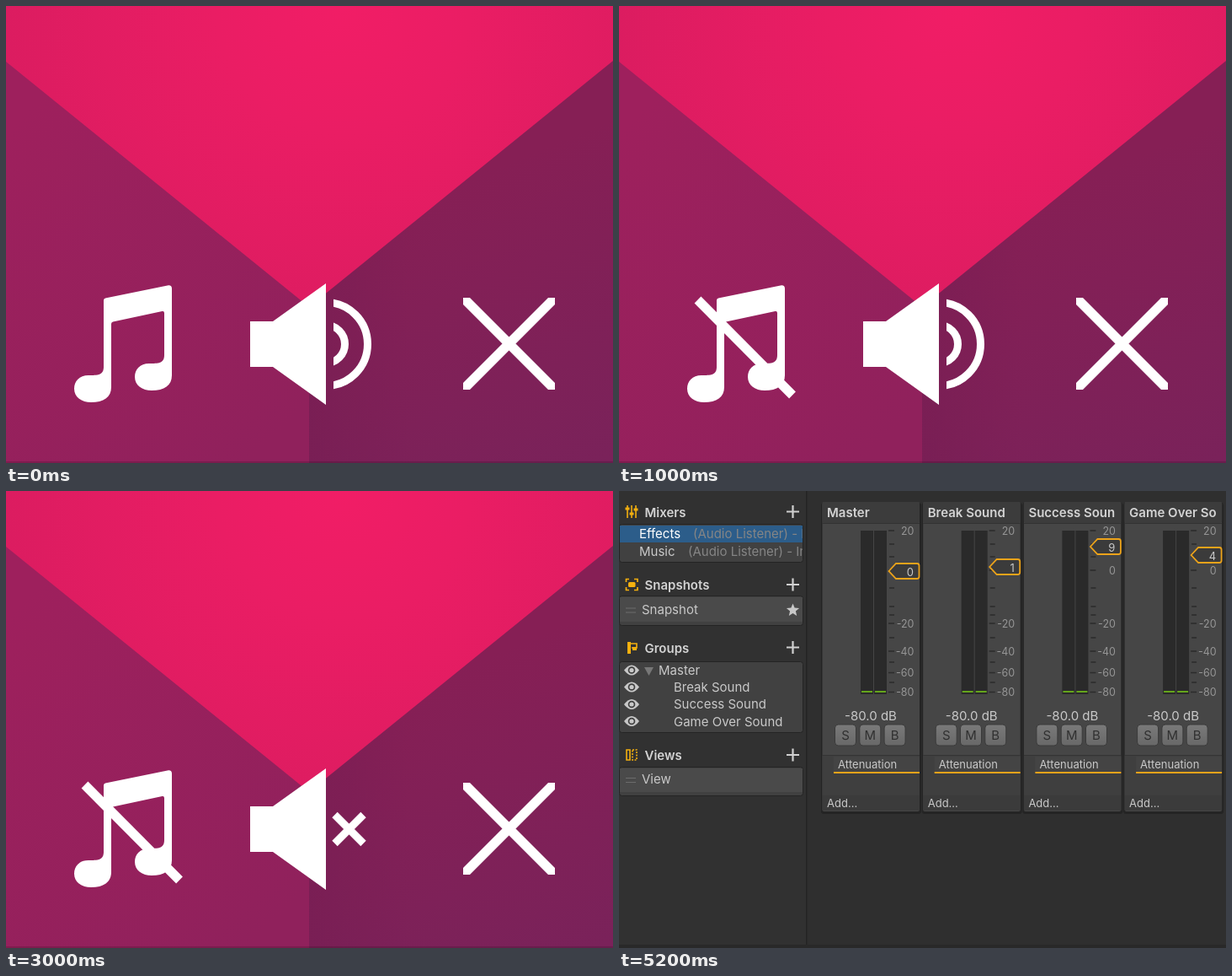
These frames come from a looping animation (721x542 px, 6000 ms). An HTML page:

```html
<!DOCTYPE html>
<html lang="en">
<head>
<meta charset="utf-8">
<title>Sound toggles and mixer</title>
<style>
  html, body { margin: 0; width: 100%; height: 100%; overflow: hidden; background: #2f2f2f; }
  svg { display: block; width: 721px; height: 542px; }
  text { font-family: Inter, Roboto, sans-serif; font-size: 15px; fill: #c9c9c9; white-space: pre; }
  .bold { font-weight: 600; fill: #d3d3d3; }
  .small { font-size: 13px; }
  .scale { font-size: 12.5px; fill: #959595; }
  .dim { fill: #858585; }
</style>
</head>
<body>
<svg viewBox="0 0 721 542">
  <defs>
    <radialGradient id="pink" gradientUnits="userSpaceOnUse" cx="400" cy="0" r="430">
      <stop offset="0" stop-color="#f11d66"/>
      <stop offset=".35" stop-color="#ea1d64"/>
      <stop offset="1" stop-color="#da1c60"/>
    </radialGradient>
    <linearGradient id="left" gradientUnits="userSpaceOnUse" x1="0" y1="150" x2="330" y2="500">
      <stop offset="0" stop-color="#9e205d"/>
      <stop offset="1" stop-color="#90215c"/>
    </linearGradient>
    <linearGradient id="right" gradientUnits="userSpaceOnUse" x1="560" y1="200" x2="700" y2="542">
      <stop offset="0" stop-color="#861f55"/>
      <stop offset="1" stop-color="#7a225a"/>
    </linearGradient>
    <linearGradient id="seam" gradientUnits="userSpaceOnUse" x1="360" y1="0" x2="480" y2="0">
      <stop offset="0" stop-color="#751d52" stop-opacity=".55"/>
      <stop offset="1" stop-color="#751d52" stop-opacity="0"/>
    </linearGradient>
    <linearGradient id="button" x1="0" y1="0" x2="0" y2="1">
      <stop offset="0" stop-color="#7a7a7a"/>
      <stop offset="1" stop-color="#686868"/>
    </linearGradient>
    <clipPath id="waveClip"><rect x="389" y="330" width="60" height="140"/></clipPath>
    <clipPath id="closeClip"><rect x="543" y="346" width="109" height="109"/></clipPath>
    <clipPath id="listClip"><rect x="1" y="40" width="217" height="44"/></clipPath>
  </defs>

  <g id="toggles">
    <rect width="721" height="542" fill="url(#pink)"/>
    <path d="M0 66L360 357V542H0Z" fill="url(#left)"/>
    <path d="M721 65L360 357V542H721Z" fill="url(#right)"/>
    <path d="M480 260L360 357V542H480Z" fill="url(#seam)"/>
    <rect y="540" width="721" height="2" fill="#000" opacity=".15"/>

    <path fill="#fff" d="M116 349Q116 347 118 346.500L193 331.200Q197 331 197 335V438
      C197 450 188 456 173 456C162 456 153 450 153 440C153 431 159 424 170 424
      C181 424 188 424 188 414V364Q188 361.500 185.500 362L127 374.500Q125 375 125 377V452
      C125 464 116 470 101 470C90 470 81 464 81 454C81 445 87 438 98 438
      C109 438 116 438 116 428Z"/>
    <path id="slash" d="M93.500 348.500L206 461.500" stroke="#fff" stroke-width="11"/>

    <path fill="#fff" d="M290 374H317L380 329V473L317 428H290Z"/>
    <g id="waves" clip-path="url(#waveClip)" fill="none" stroke="#fff" stroke-width="9">
      <circle cx="380" cy="401" r="49.500"/>
      <circle cx="380" cy="401" r="22.500"/>
    </g>
    <path id="mute" d="M390.500 384L424.500 418M424.500 384L390.500 418" stroke="#fff" stroke-width="9"/>
    <path clip-path="url(#closeClip)" d="M533 336L662 465M662 336L533 465" stroke="#fff" stroke-width="11.300"/>
  </g>

  <g id="mixer"></g>
</svg>
<script>
const $ = id => document.getElementById(id);
const tag = (name, attrs, body = '') =>
  `<${name} ${Object.entries(attrs).map(([k, v]) => `${k}="${v}"`).join(' ')}>${body}</${name}>`;
const box = (x, y, width, height, fill, more) => tag('rect', { x, y, width, height, fill, ...more });
const label = (x, y, body, cls = '', more) => tag('text', { x, y, class: cls, ...more }, body);
const line = (d, stroke, width = 1, fill = 'none') => tag('path', { d, stroke, 'stroke-width': width, fill });
const shape = (d, fill) => tag('path', { d, fill });

const GOLD = '#f3b00f', ORANGE = '#eda31a', LIGHT = '#c8c8c8';

function listBox(y, h, fill) {
  return box(.5, y + .5, 218, h - 1, fill, { rx: 3, stroke: '#242424' });
}

function header(y, title) {
  return label(30.5, y + 6, title, 'bold') +
    line(`M199 ${y}H214M206.500 ${y - 7.5}V${y + 7.5}`, '#d0d0d0', 2.2);
}

function handle(y) {
  return line(`M8 ${y - 2.5}H20M8 ${y + 2.5}H20`, '#6c6c6c', 1);
}

function eye(y) {
  return shape(`M6 ${y}Q15 ${y - 12} 24 ${y}Q15 ${y + 12} 6 ${y}Z`, LIGHT) +
    tag('circle', { cx: 15, cy: y, r: 4.3, fill: '#3f3f3f' }) +
    tag('circle', { cx: 15, cy: y, r: 2.6, fill: LIGHT });
}

function star(cx, cy, r) {
  const points = Array.from({ length: 10 }, (_, i) => {
    const a = i * Math.PI / 5, d = i % 2 ? r * .45 : r;
    return [cx + d * Math.sin(a), cy - d * Math.cos(a)].map(n => n.toFixed(1));
  });
  return tag('polygon', { points: points.join(' '), fill: LIGHT });
}

function sidebar() {
  const icons =
    line('M10 17V32M15 17V32M20 17V32', GOLD, 1.6) +
    line('M7.500 21H12.500M12.500 27H17.500M17.500 22H22.500', GOLD, 3) +
    line('M8.500 108V104.500H12M18 104.500H22V108M22 114V117.500H18M12 117.500H8.500V114', GOLD, 1.7) +
    box(11, 108, 8.5, 6, GOLD, { rx: 1.5 }) +
    box(10, 179, 4, 14, GOLD) + line('M14 181H21V186H15', GOLD, 1.6) + box(16, 185, 5, 4, GOLD) +
    line('M9 307H13V319H9Z', GOLD, 1.6) +
    tag('path', { d: 'M16 307H21V319H16Z', fill: 'none', stroke: GOLD, 'stroke-width': 1.6, 'stroke-dasharray': '2 1.5' });

  const mixers = listBox(39, 46, '#414141') + tag('g', { 'clip-path': 'url(#listClip)' },
    box(1, 41, 217, 20, '#2c5d8a') +
    label(24, 56, 'Effects', '', { style: 'fill:#fff' }) +
    label(88, 56, '(Audio Listener) - In', 'dim') +
    label(24, 76.5, 'Music') + label(82, 76.5, '(Audio Listener) - In', 'dim'));

  const snapshots = listBox(124, 36, '#414141') + box(1, 126, 217, 29, '#4a4a4a') +
    handle(141.5) + label(27, 145.5, 'Snapshot') + star(206.5, 141.5, 8);

  const groups = listBox(202, 85, '#414141') +
    [212.5, 232.5, 253, 273].map(eye).join('') +
    shape('M30 209H41L35.500 219Z', '#777') +
    label(47, 217.5, 'Master') +
    ['Break Sound', 'Success Sound', 'Game Over Sound']
      .map((name, i) => label(65, 238 + i * 20.3, name)).join('');

  const views = listBox(327, 35, '#414141') + box(1, 329, 217, 28, '#4a4a4a') +
    handle(343) + label(27, 347, 'View');

  return box(0, 0, 222, 542, '#313131') + box(222, 0, 1.5, 542, '#242424') +
    header(24.5, 'Mixers') + header(111, 'Snapshots') + header(185.5, 'Groups') + header(313, 'Views') +
    icons + mixers + snapshots + groups + views;
}

function channel([title, value, y], i) {
  const end = { 'text-anchor': 'end' }, mid = { 'text-anchor': 'middle' };
  const marks = [[20, 47], [0, 94], [-20, 157], [-40, 190], [-60, 215.5], [-80, 238.5]];
  const minor = [63, 78, 115, 137, 147, 174, 203, 227];

  const frame =
    box(-1, 14, 119, 369, '#202020', { rx: 3, opacity: .75 }) +
    box(.5, 13, 115.5, 367, '#464646', { rx: 2 }) +
    box(.5, 13, 115.5, 25, '#3c3c3c', { rx: 2 }) + box(.5, 38, 115.5, 1, '#333') +
    label(6, 31, title, 'bold');

  const meter = [46, 62].map(x => box(x, 47, 15, 194, '#2a2a2a') + box(x + 1, 237, 13, 2, '#65a51c')).join('') +
    line(marks.map(m => `M79 ${m[1]}H86`).join('') + minor.map(m => `M80 ${m}H86`).join(''), '#2b2b2b', 1.3) +
    marks.map(([n, my]) => label(109.5, my + 4.5, n, 'scale', end)).join('');

  const fader = line(`M79.500 ${y}L88 ${y - 9}H113Q115.500 ${y - 9} 115.500 ${y - 6.5}V${y + 6.5}Q115.500 ${y + 9} 113 ${y + 9}H88Z`, ORANGE, 1.8, '#3b3b3b') +
    label(109, y + 5.5, value, 'small', end);

  const buttons = ['S', 'M', 'B'].map((c, k) => {
    const x = 28 + k * 29.3;
    return box(x - 12.5, 277, 25, 25, 'url(#button)', { rx: 4, stroke: '#3a3a3a' }) +
      label(x, 294.5, c, '', { ...mid, style: 'fill:#303030' });
  }).join('');

  const effects =
    box(.5, 313, 115.5, 1.2, '#343434') + box(.5, 314, 115.5, 47, '#3f3f3f') +
    box(14, 315, 102, 18, '#444') + box(14, 333, 102, 2, ORANGE) +
    label(19, 329, 'Attenuation', 'small') +
    box(.5, 361, 115.5, 18, '#3b3b3b') + label(6, 375, 'Add...', 'small');

  return tag('g', { transform: `translate(${241 + i * 119.7} 0)` },
    frame + meter + fader + label(58, 272, '-80.0 dB', '', mid) + buttons + effects);
}

const channels = [['Master', 0, 95], ['Break Sound', 1, 90], ['Success Soun', 9, 66], ['Game Over So', 4, 76]];
$('mixer').innerHTML = box(0, 0, 721, 542, '#2f2f2f') + sidebar() +
  channels.map(channel).join('') + box(0, 538, 721, 4, '#292929');

// Each step: start time, then which parts are on.
const steps = [
  [0, { waves: 1 }],
  [1000, { waves: 1, slash: 1 }],
  [2000, { mute: 1 }],
  [3000, { mute: 1, slash: 1 }],
  [4000, { mixer: 1 }]
];
const LOOP = 6000;

function draw() {
  const t = performance.now() % LOOP;
  const on = steps.filter(s => s[0] <= t).pop()[1];
  for (const id of ['waves', 'slash', 'mute', 'mixer'])
    $(id).style.display = on[id] ? '' : 'none';
  requestAnimationFrame(draw);
}
draw();
</script>
</body>
</html>
```
